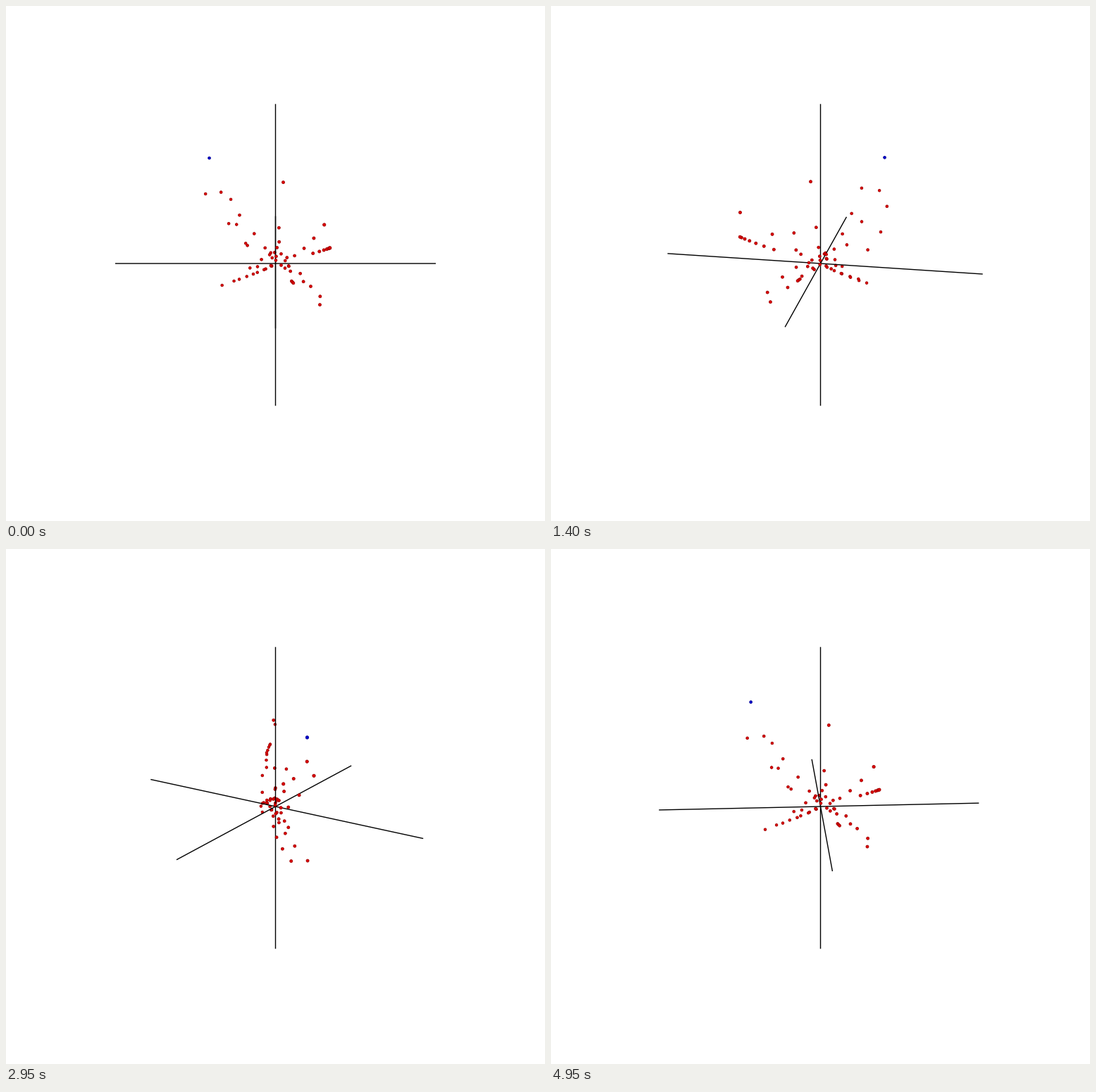
Write a matplotlib script that moves like this. It is 765 by 732 pixels and loops after 5000 ms.

```python
import numpy as np
import matplotlib.pyplot as plt
from matplotlib.animation import FuncAnimation

W, H, DPI = 765, 732, 100
PT = 72 / DPI                     # points per pixel
FRAMES, STEP = 100, 50
AXIS = 227.5                      # half length of each axis
DIST = 6 * AXIS                   # camera distance
TILT = np.radians(20)
RADIUS, RIM = 2.3, 0.7


def arm(count, tip, bend=None, reach=None, ease=1):
    """Dots along a curve from the tip in to the centre."""
    tip = np.array(tip, float)
    bend = tip / 2 if bend is None else np.array(bend)
    reach = 1 - 1 / count if reach is None else reach
    t = reach * np.linspace(0, 1, count)[:, None] ** ease
    return (1 - t) ** 2 * tip + 2 * t * (1 - t) * bend


def stem(count, top, shrink):
    """Dots down a line to the centre, each closer by the same factor."""
    return np.outer(shrink ** np.arange(count), top)


# x to the right, y towards the viewer, z up
reds = np.vstack([
    stem(5, (10.6, 11.7, 122.3), 0.45),
    # upper left
    arm(5, (-78, -46, 92), (-5, -20, 6)),
    arm(5, (-102, -69, 83), (-8, -13, -28)),
    arm(3, (-66, -85, 70), (-55, -80, -16), reach=0.5),
    # right
    arm(5, (63, 98, 89), (35, -18, 0)),
    arm(7, (71, 97, 57), (66, 62, 41), reach=0.5, ease=1.6),
    arm(4, (5, 37, 45), (35, 11, -20)),
    # lower left
    arm(5, (-79, -43, -50), (-8, -21, -16)),
    arm(5, (-62, -58, -49), (-9, -38, -22)),
    arm(2, (-37, -25, -16), reach=0.3),
    # lower right
    arm(4, (61, 59, -39), (39, 10, 4)),
    arm(4, (61, 63, -25), (11, 30, 12)),
    arm(3, (25, 28, -19), reach=0.1),
    # middle
    arm(4, (8, -10, 11), (-20, -5, 21), reach=0.6),
])
dots = np.vstack([reds, [(-95.7, -76.4, 134.7)]])
faces = np.array(["#dc0000"] * len(reds) + ["#0000cc"])
rims = np.array(["#980000"] * len(reds) + ["#000090"])


def spin(points, angle):
    x, y, z = np.asarray(points, float).T
    c, s = np.cos(angle), np.sin(angle)
    return np.column_stack([c * x - s * y, s * x + c * y, z])


def project(points):
    """Screen positions and perspective scale of turned points."""
    x, y, z = points.T
    c, s = np.cos(TILT), np.sin(TILT)
    scale = DIST / (DIST - c * y - s * z)
    screen = np.column_stack([W / 2 + scale * x,
                              H / 2 - scale * (c * z - s * y)])
    return screen, scale


fig = plt.figure(figsize=(W / DPI, H / DPI), dpi=DPI, facecolor="white")
ax = fig.add_axes([0, 0, 1, 1])
ax.set_xlim(0, W)
ax.set_ylim(H, 0)
ax.axis("off")

axes_lines = [ax.plot([], [], color="black", lw=1.4 * PT, snap=False,
                      solid_capstyle="butt", zorder=2)[0] for _ in range(3)]
behind = ax.scatter([], [], zorder=1)
before = ax.scatter([], [], zorder=3)


def fill(layer, pick, screen, scale):
    layer.set_offsets(screen[pick])
    layer.set_sizes(((2 * RADIUS * scale[pick] - RIM) * PT) ** 2)
    layer.set_facecolor(faces[pick])
    layer.set_edgecolor(rims[pick])
    layer.set_linewidth(RIM * PT)


def draw(frame):
    angle = 2 * np.pi * frame / FRAMES
    for line, unit in zip(axes_lines, np.eye(3)):
        ends, _ = project(spin([-AXIS * unit, AXIS * unit], angle))
        line.set_data(ends[:, 0], ends[:, 1])
    turned = spin(dots, angle)
    screen, scale = project(turned)
    order = np.argsort(scale)     # far dots first
    near = turned[order, 1] >= 0
    fill(behind, order[~near], screen, scale)
    fill(before, order[near], screen, scale)
    return [*axes_lines, behind, before]


anim = FuncAnimation(fig, draw, frames=FRAMES, interval=STEP,
                     repeat=True, repeat_delay=0, blit=False)
plt.show()
```
